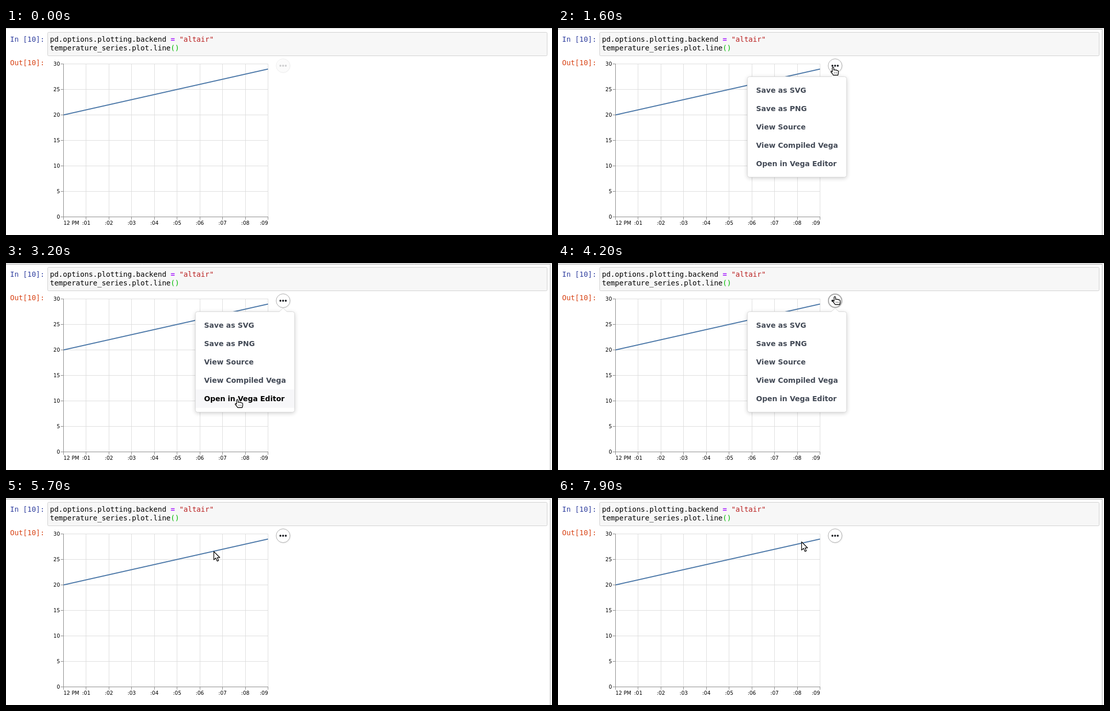
These frames come from a looping animation (1068 px wide and 406 px high, 8 s). An HTML page with a canvas:

```html
<!DOCTYPE html>
<html>
<head>
<meta charset="utf-8">
<style>
  html, body { margin: 0; width: 100%; height: 100%; overflow: hidden; background: #fff; }
  canvas { display: block; }
</style>
</head>
<body>
<canvas id="stage" width="1068" height="406"></canvas>
<script>
const ctx = document.getElementById('stage').getContext('2d');
const LOOP = 8000, STEP = 100;
const MONO = '14px "DejaVu Sans Mono", monospace';
const LABEL = '10px "DejaVu Sans", sans-serif';
const MENU_FONT = 'bold 14px "DejaVu Sans", sans-serif';
const MENU = ['Save as SVG', 'Save as PNG', 'View Source', 'View Compiled Vega', 'Open in Vega Editor'];

// Pointer hotspot: time, x, y
const TRACK = [
  [400, 491, 24], [500, 518, 46], [600, 549, 72], [700, 566, 82], [900, 538, 76.5],
  [1800, 538, 76.5], [2200, 465, 109.5], [2300, 465, 109.5], [2500, 457.5, 133.5],
  [3200, 452.5, 267.5], [3300, 453, 270], [4100, 541.5, 65.5], [4400, 541.5, 65.5],
  [4700, 633, 100], [5000, 560, 139], [5300, 431, 98], [5500, 403, 105],
  [5600, 403, 105], [5700, 406.5, 105], [6400, 482, 88.5], [6600, 482, 88.5],
  [7300, 505, 79.5], [7400, 505, 79.5], [7900, 476.5, 86]
];

const ARROW = new Path2D('M0 0V16.2L3.8 12.8L6.6 18.8L9.3 17.7L6.7 11.8H11.6Z');
const HAND = new Path2D('M-1.5 9.5V2Q-1.5 .5 0 .5T1.5 2V6Q3 4.7 4.5 6.2Q6 5.2 7.3 6.7Q10.5 6.5 10.5 9V12L9.5 16H.5L-1 13.5L-4 10Q-4.5 7.7-2.5 8.3Z');
const CREASES = new Path2D('M2.5 10.5v2M5 10.5v2M7.5 10.5v2');
const BEAM = new Path2D('M-3 -8.5H-1L0 -7.5L1 -8.5H3M0 -7.5V7.5M-3 8.5H-1L0 7.5L1 8.5H3');

const clamp = v => Math.max(0, Math.min(1, v));

function text(str, x, y, color, font, align = 'left') {
  ctx.font = font;
  ctx.fillStyle = color;
  ctx.textAlign = align;
  ctx.fillText(str, x, y);
}

function line(x1, y1, x2, y2, color, width = 1) {
  ctx.strokeStyle = color;
  ctx.lineWidth = width;
  ctx.beginPath();
  ctx.moveTo(x1, y1);
  ctx.lineTo(x2, y2);
  ctx.stroke();
}

function box(x, y, w, h, radius, fill, stroke) {
  ctx.beginPath();
  ctx.roundRect(x, y, w, h, radius);
  ctx.fillStyle = fill;
  ctx.fill();
  if (!stroke) return;
  ctx.shadowColor = 'transparent';
  ctx.strokeStyle = stroke;
  ctx.lineWidth = 1;
  ctx.stroke();
}

function shadow(alpha, blur, x, y) {
  ctx.shadowColor = `rgba(0,0,0,${alpha})`;
  ctx.shadowBlur = blur;
  ctx.shadowOffsetX = x;
  ctx.shadowOffsetY = y;
}

function drawCell(selected) {
  ctx.fillStyle = '#fff';
  ctx.fillRect(0, 0, 1068, 406);
  ctx.fillStyle = '#eee';
  ctx.fillRect(0, 0, 1068, 2);
  line(0, 0.5, 1068, 0.5, '#e3e3e3');
  if (selected) {
    line(0, 2.5, 1065, 2.5, '#ababab');
    line(1064.5, 2, 1064.5, 406, '#ababab');
  }
  box(81.5, 8.5, 977, 46, 2, '#f7f7f7', '#cfcfcf');
  text('In [10]:', 8, 27, '#303f9f', MONO);
  text('Out[10]:', 8, 73, '#d84315', MONO);

  const charWidth = 8.43;
  const code = (str, column, y, color, weight = '') =>
    text(str, 86 + column * charWidth, y, color, weight + MONO);
  code('pd.options.plotting.backend', 0, 27, '#000');
  code('=', 28, 27, '#aa22ff', 'bold ');
  code('"altair"', 30, 27, '#ba2121');
  code('temperature_series.plot.line', 0, 44, '#000');
  code('()', 28, 44, '#00bb00');
}

function drawChart() {
  const ticksX = Array.from({ length: 10 }, (_, i) => 112 + i * 400 / 9);
  for (const x of ticksX) line(Math.round(x) + .5, 70, Math.round(x) + .5, 370, '#ddd');
  for (let v = 0; v <= 30; v += 5) {
    const y = 370.5 - v * 10;
    line(112, y, 513, y, '#ddd');
    line(107, y, 112, y, '#888');
    text(v, 105.5, y + 3.5, '#000', LABEL, 'right');
  }
  ticksX.forEach((x, i) => {
    line(Math.round(x) + .5, 370, Math.round(x) + .5, 376, '#888');
    if (i === 0) text('12 PM', 112.5, 386, '#000', LABEL);
    else if (i === 9) text(':09', 512.5, 386, '#000', LABEL, 'right');
    else text(':0' + i, x + .5, 386, '#000', LABEL, 'center');
  });
  line(112.5, 70, 112.5, 371, '#888');
  line(112, 370.5, 513, 370.5, '#888');
  line(112.5, 170.5, 512.5, 80.5, '#4c78a8', 2);
}

function drawButton(opacity, pressed) {
  ctx.save();
  ctx.globalAlpha = opacity;
  shadow(.1, 3, 1, 1);
  box(528.5, 60.5, 27, 27, 13.5, '#fff', '#aaa');
  if (pressed) {
    ctx.lineWidth = 2;
    ctx.beginPath();
    ctx.arc(542, 74, 13, 0, 7);
    ctx.stroke();
  }
  ctx.fillStyle = '#1b1e23';
  for (const x of [536.75, 542, 547.25]) {
    ctx.beginPath();
    ctx.arc(x, 74, 1.9, 0, 7);
    ctx.fill();
  }
  ctx.restore();
}

function drawMenu(hovered, scale, opacity) {
  ctx.save();
  ctx.globalAlpha = opacity;
  ctx.translate(467.5, 194);
  ctx.scale(scale, scale);
  ctx.translate(-467.5, -194);
  shadow(.2, 8, 0, 2);
  box(370.5, 95.5, 194, 197, 4, '#fff', '#d9d9d9');
  ctx.fillStyle = '#fff';
  ctx.beginPath();
  ctx.moveTo(534.5, 96);
  ctx.lineTo(542, 88.5);
  ctx.lineTo(549.5, 96);
  ctx.fill();
  line(534.5, 95.5, 542, 88.5, '#d9d9d9');
  line(542, 88.5, 549.5, 95.5, '#d9d9d9');
  MENU.forEach((item, i) => {
    const top = 104 + 36 * i;
    if (i === hovered) box(371, top, 193, 36, 0, '#f7f7f9');
    text(item, 387.5, top + 23, i === hovered ? '#000' : '#434a56', MENU_FONT);
  });
  ctx.restore();
}

function pointerAt(t) {
  if (t < TRACK[0][0]) return null;
  const next = TRACK.findIndex(p => p[0] > t);
  if (next < 0) return TRACK[TRACK.length - 1].slice(1);
  const [t0, x0, y0] = TRACK[next - 1], [t1, x1, y1] = TRACK[next];
  const k = (t - t0) / (t1 - t0);
  return [x0 + (x1 - x0) * k, y0 + (y1 - y0) * k];
}

function drawPointer([x, y], overLink) {
  ctx.save();
  ctx.translate(x, y);
  ctx.lineJoin = 'round';
  ctx.strokeStyle = '#000';
  ctx.fillStyle = '#fff';
  ctx.lineWidth = 1.3;
  if (y < 54) {
    ctx.stroke(BEAM);
  } else {
    const shape = overLink ? HAND : ARROW;
    ctx.fill(shape);
    ctx.stroke(shape);
    if (overLink) {
      ctx.lineWidth = .7;
      ctx.stroke(CREASES);
    }
  }
  ctx.restore();
}

function draw(t) {
  const pointer = pointerAt(t);
  const menuOpen = t >= 1500 && t < 4300;
  let hovered = -1, overButton = false;
  if (pointer) {
    const [x, y] = pointer;
    overButton = Math.hypot(x - 542, y - 74) < 14;
    if (menuOpen && x > 371 && x < 564 && y > 104 && y < 284) hovered = Math.floor((y - 104) / 36);
  }
  drawCell(t >= 1400);
  drawChart();
  drawButton(.2 + .8 * clamp((t - 400) / 400) ** 1.7, t === 4200);
  if (menuOpen) drawMenu(hovered, t < 1600 ? .95 : 1, t < 1600 ? .7 : 1);
  if (pointer) drawPointer(pointer, overButton || hovered >= 0);
}

function frame() {
  draw(Math.floor(performance.now() % LOOP / STEP) * STEP);
  requestAnimationFrame(frame);
}
frame();
</script>
</body>
</html>
```
